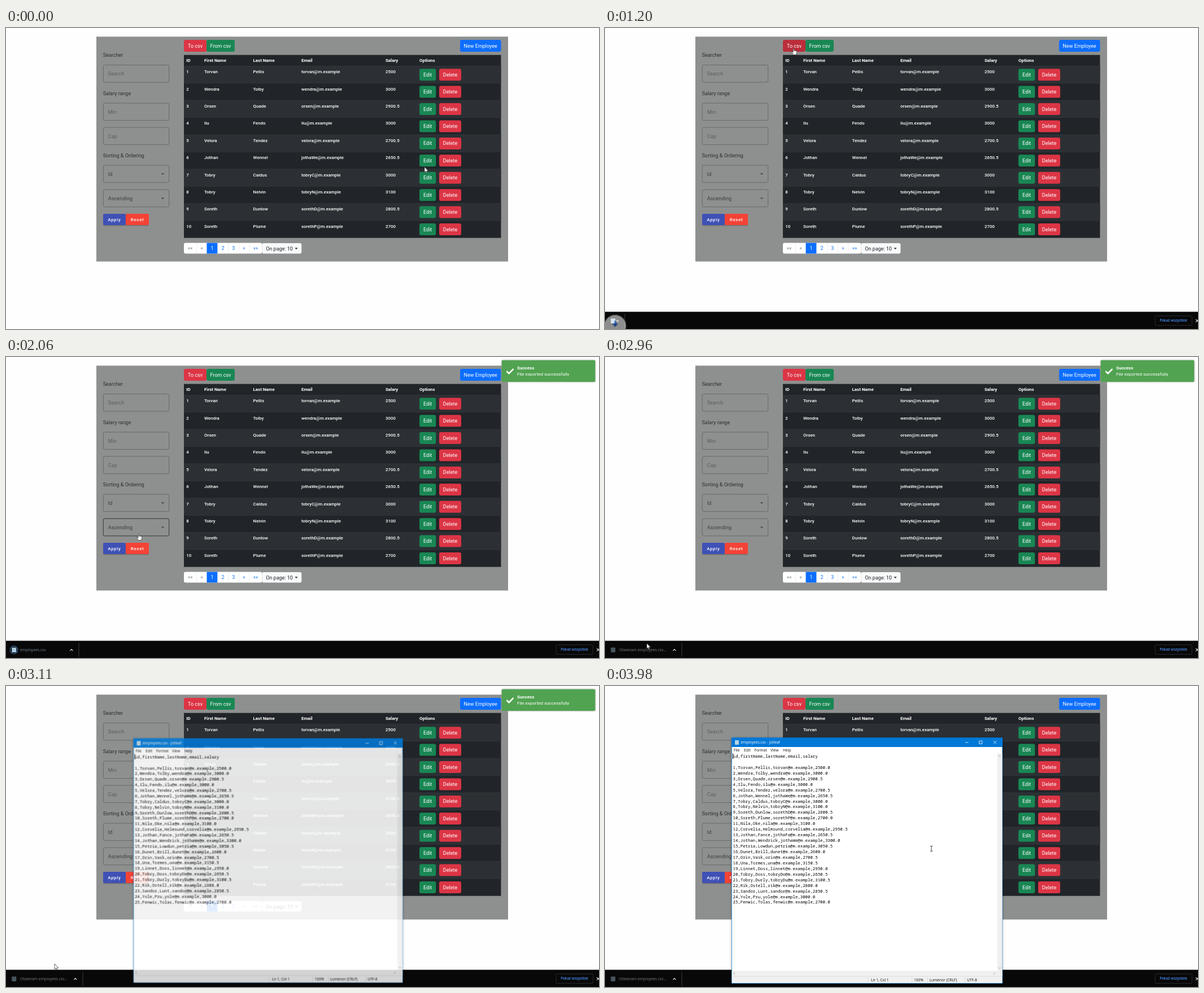
Animation of 1050x533 px, one loop 4510 ms. Source, as an HTML page:

```html
<!DOCTYPE html>
<html lang="en">
<head>
<meta charset="utf-8">
<title>Employee export</title>
<style>
html, body { margin: 0; width: 100%; height: 100%; overflow: hidden; background: #fefefe; }
svg { display: block; position: absolute; left: 0; top: 0; }
text { font-family: Roboto, sans-serif; font-size: 9px; fill: #fff; }
.mid { text-anchor: middle; }
.label { fill: #2b2e30; }
.field { fill: none; stroke: #5f6160; stroke-width: .8; }
.hint { fill: #5b5d5c; letter-spacing: .15px; }
.value { fill: #3b3d3d; letter-spacing: .15px; }
.raised { font-size: 7.9px; font-weight: 500; letter-spacing: .7px; }
.head { font-size: 7.9px; font-weight: 700; }
.cell { font-size: 7.9px; font-weight: 500; }
.link { fill: #0d6efd; }
.off { fill: #6c757d; }
.dark { fill: #212529; }
.note { font-size: 8px; }
.strong { font-weight: 700; }
.sys { font-family: "Open Sans", sans-serif; font-size: 6.6px; }
.ink { fill: #111; }
.busy { font-size: 6.75px; fill: #777c81; }
.all { font-size: 6.3px; font-weight: 600; fill: #4a90fb; }
.code { font-family: "Noto Sans Mono", monospace; font-size: 7.37px; fill: #000; }
.line { fill: none; }
#file { font: 6.75px/10px "Open Sans", sans-serif; color: #76838f; overflow: hidden; text-overflow: ellipsis; }

.anim, .cut { animation: 4510ms linear infinite; }
.cut { animation-timing-function: step-end; }
#toCsv { animation-name: press; }
#pick { animation-name: pick; }
#toast { animation-name: toast; }
#toast rect { filter: drop-shadow(0 0 1.8px #999); }
#shelf { animation-name: shelf; }
#edge { animation-name: edge; }
#file { animation-name: file; }
#plain { animation-name: plain; }
#opening { animation-name: opening; }
#icon { animation-name: icon; }
#ring { animation-name: ring; }
#bubble { animation-name: bubble; }
#bubble circle { filter: drop-shadow(0 0 1px #bbb); }
#win { animation-name: win; transform-origin: 464px 309px; }
#frame { filter: drop-shadow(0 1px 2px #0005); }
#caret { animation-name: caret; }
#cursor { animation-name: move; }
#arrow { animation-name: arrow; }
#hand { animation-name: hand; }
#beam { animation-name: beam; }

@keyframes press { 0%, 19% { fill: #dc3545 } 21%, 33.7% { fill: #bb2d3b } 36%, 100% { fill: #dc3545 } }
@keyframes pick { 0% { stroke: #5f6160 } 44.3% { stroke: #1c1e1e } 48% { stroke: #5f6160 } }
@keyframes toast { 0%, 27.9% { opacity: 0 } 31.5%, 73.5% { opacity: 1 } 80%, 100% { opacity: 0 } }
@keyframes shelf { 0%, 23.3% { transform: translateY(31px) } 26.6%, 100% { transform: none } }
@keyframes edge {
  0%, 25.06% { transform: translateX(22px) }
  32.15%, 33.6% { transform: translateX(80px) }
  38.14%, 59.86% { transform: translateX(129px) }
  59.87%, 100% { transform: translateX(136px) }
}
@keyframes file { 0%, 28.8% { width: 0 } 32.15%, 33.6% { width: 27px } 38.14%, 100% { width: 76px } }
@keyframes plain { 0% { opacity: 1 } 59.87% { opacity: 0 } }
@keyframes opening { 0% { opacity: 0 } 59.87% { opacity: 1 } }
@keyframes icon { 0% { opacity: 1 } 59.87% { opacity: .4 } }
@keyframes ring { 0%, 27.9% { opacity: 0 } 32%, 46% { opacity: .9 } 58%, 100% { opacity: 0 } }
@keyframes bubble {
  0%, 25% { transform: translateY(42px); opacity: 0 }
  28% { opacity: 1 }
  32.15%, 33.6% { transform: none; opacity: 1 }
  38.1%, 100% { transform: translateY(-36px); opacity: 0 }
}
@keyframes win {
  0%, 66.96% { transform: scale(.95); opacity: 0 }
  68.96%, 70.2% { transform: scale(.994); opacity: .88 }
  71.8%, 100% { transform: none; opacity: 1 }
}
@keyframes caret { 0% { opacity: 1 } 77.6% { opacity: 0 } 88.25% { opacity: 1 } }
@keyframes move {
  0%, 3.99% { transform: translate(741px, 246px) }
  5.54% { transform: translate(675px, 312px) }
  7.1% { transform: translate(575px, 365px) }
  8.43% { transform: translate(470px, 383px) }
  9.98% { transform: translate(395px, 335px) }
  11.53% { transform: translate(355px, 220px) }
  12.86% { transform: translate(338px, 112px) }
  14.41% { transform: translate(333px, 52px) }
  15.96%, 29.49% { transform: translate(334px, 36px) }
  32.15%, 33.7% { transform: translate(320px, 43px) }
  38.14%, 39.5% { transform: translate(287px, 120px) }
  45.68%, 47.2% { transform: translate(235px, 313px) }
  50.33% { transform: translate(131px, 422px) }
  57.65%, 67% { transform: translate(74px, 507px) }
  68.96%, 70.2% { transform: translate(86px, 492px) }
  74.72% { transform: translate(161px, 428px) }
  80% { transform: translate(370px, 345px) }
  86.7%, 100% { transform: translate(578px, 288px) }
}
@keyframes arrow { 0% { opacity: 1 } 15.9% { opacity: 0 } 31% { opacity: 1 } 44.3% { opacity: 0 } 49% { opacity: 1 } 76.3% { opacity: 0 } }
@keyframes hand { 0% { opacity: 0 } 15.9% { opacity: 1 } 31% { opacity: 0 } 44.3% { opacity: 1 } 49% { opacity: 0 } }
@keyframes beam { 0% { opacity: 0 } 76.3% { opacity: 1 } }
</style>
</head>
<body>
<svg id="stage" width="1050" height="533" viewBox="0 0 1050 533"></svg>
<script>
// first name, last name, salary, optional mailbox
const people = `Torvan Pellis 2500|Wendra Tolby 3000|Orsen Quade 2900.5|Ilu Fendo 3000|Velora Tendez 2700.5
Jothan Wennel 2650.5 jothaWe|Tobry Caldus 3000 tobryC|Tobry Nelvin 3100 tobryN|Soreth Dunlow 2800.5 sorethD
Soreth Plume 2700 sorethP|Nila Oke 3100|Corvelia Helmsund 2950.5|Jothan Fance 2650.5 jothaFa
Jothan Wendrick 3300 jothaWe|Petria Lowdun 3050.5|Dunet Brill 2600|Orin Vask 2700.5|Una Tormes 3150.5
Linnet Doss 2950|Tobry Doss 2650.5 tobryDo|Tobry Durly 3100.5 tobryDu|Rik Ostell 2800|Sandor Lunt 2850.5
Yole Pru 3000|Fenwic Tolas 2700`.split(/[|\n]/).map((row, i) => {
  const [first, last, pay, box = first.toLowerCase()] = row.split(' ');
  return { id: i + 1, first, last, mail: box + '@m.example', pay };
});

const rect = (x, y, w, h, fill, rx = 0, attrs = '') =>
  `<rect x="${x}" y="${y}" width="${w}" height="${h}" rx="${rx}" fill="${fill}" ${attrs}/>`;
const text = (x, y, s, cls = '') => `<text x="${x}" y="${y}" class="${cls}">${s}</text>`;
const line = (d, stroke, width = 1) => `<path d="${d}" class="line" stroke="${stroke}" stroke-width="${width}"/>`;
const shape = (d, fill) => `<path d="${d}" fill="${fill}"/>`;
const group = (id, cls, body) => `<g id="${id}" class="${cls}">${body}</g>`;
const button = (x, y, w, h, fill, label, attrs = '') =>
  rect(x, y, w, h, fill, 3.2, attrs) + text(x + w / 2, y + h / 2 + 3.1, label, 'mid');
const field = (y, label, cls = 'hint', id = '') =>
  `<rect id="${id}" class="field cut" x="172.3" y="${y}" width="116.4" height="30.6" rx="2.3"/>` +
  text(180.7, y + 18.9, label, cls);
const select = (y, label, id) =>
  field(y, label, 'value', id) + shape(`M274.6 ${y + 14.2}h5.8l-2.9 2.9z`, '#474948');

function sidebar() {
  return text(171.7, 51.3, 'Searcher', 'label') + field(65.5, 'Search') +
    text(171.7, 118.7, 'Salary range', 'label') + field(133, 'Min') + field(176, 'Cap') +
    text(171.7, 229.3, 'Sorting &amp; Ordering', 'label') +
    select(243, 'Id', 'order') + select(286.2, 'Ascending', 'pick') +
    rect(172, 330, 81, 20.4, '#0003', 2) +
    rect(172, 329, 40, 20, '#3f51b5', 2) + text(180.2, 341.5, 'Apply', 'raised') +
    rect(212, 329, 41, 20, '#f44336', 2) + text(220.8, 341.5, 'Reset', 'raised');
}

function table() {
  const cols = [319.3, 351, 437.6, 523, 672, 732];
  const top = 67.3, pitch = 30.42;
  let out = rect(315, 47.7, 561.5, 324, '#212529');
  ['ID', 'First Name', 'Last Name', 'Email', 'Salary', 'Options']
    .forEach((h, i) => out += text(cols[i], 60, h, 'head'));
  people.slice(0, 10).forEach((p, r) => {
    const y = top + r * pitch;
    if (r % 2 === 0) out += rect(315, y, 561.5, pitch, '#2c3034');
    out += rect(315, y - .3, 561.5, .6, '#373b3e');
    [p.id, p.first, p.last, p.mail, p.pay].forEach((v, i) => out += text(cols[i], y + 12.8, v, 'cell'));
    out += button(732, y + 4.9, 29.3, 21, '#198754', 'Edit') + button(767, y + 4.9, 39, 21, '#dc3545', 'Delete');
  });
  return out;
}

function pager() {
  const cells = [['««', 315, 'off'], ['«', 337.5, 'off'], ['1', 355.5, ''], ['2', 374.5, 'link'],
    ['3', 393.5, 'link'], ['»', 412.3, 'link'], ['»»', 430.5, 'link']];
  let out = rect(315, 380.5, 138.3, 19, '#fff', 3);
  cells.forEach(([s, x, cls], i) => {
    const end = i < 6 ? cells[i + 1][1] : 453.3;
    out += cls ? (i ? rect(x, 380.7, .6, 18.6, '#dee2e6') : '') : rect(x, 380.5, end - x, 19, '#0d6efd');
    out += text((x + end) / 2, 393.2, s, 'mid ' + cls);
  });
  return out + rect(453.3, 381, 70, 18.5, '#f8f9fa', 3) + text(460.2, 394, 'On page: 10', 'dark') +
    shape('M511.4 389.2h5.2l-2.6 2.7z', '#212529');
}

function page() {
  return rect(160, 15.3, 729, 398.2, '#8e908f') + sidebar() +
    button(315, 21, 40, 21, '#dc3545', 'To csv', 'id="toCsv" class="anim"') +
    button(355, 21, 50, 21, '#198754', 'From csv') +
    button(804, 21, 72.5, 21, '#0d6efd', 'New Employee') + table() + pager();
}

function toast() {
  return group('toast', 'anim', rect(877.7, 5.7, 165.6, 38.3, '#51a351', 1.7) +
    line('M886.5 25.2l4 4 8-8', '#fff', 2.6) +
    text(905, 21.7, 'Success', 'note strong') + text(905, 32.6, 'File exported successfully', 'note'));
}

function shelf() {
  const bar = rect(0, 502.5, 1050, 31, '#080808') +
    `<circle id="ring" class="anim" cx="14" cy="518.7" r="6.8" fill="none" stroke="#3a78b8" stroke-width="1.1"/>` +
    group('icon', 'cut', rect(10.3, 514.5, 8, 8.5, '#a9c8dc', 1)) +
    group('plain', 'cut', `<foreignObject x="25" y="513.5" width="110" height="12">
      <div id="file" class="anim">employees.csv</div></foreignObject>`) +
    group('opening', 'cut', text(25, 521.3, 'Otwieram employees.csv...', 'sys busy')) +
    group('edge', 'anim', line('M0 506.5V531', '#444', .9) + line('M-15.6 520.2l2.5-2.5 2.5 2.5', '#e8e8e8', 1.2)) +
    rect(974, 509.8, 65.3, 16.8, 'none', 2, 'stroke="#34373b" stroke-width=".8"') +
    text(1006.5, 520.4, 'Pokaż wszystkie', 'sys mid all') +
    line('M1046 515.8l5 5m0-5l-5 5', '#e8e8e8', 1.1);
  const bubble = '<circle cx="18" cy="495" r="19" fill="#fff"/>' +
    shape('M16 486h4v5h3.6l-5.6 6-5.6-6h3.6z', '#3b7de9') + rect(9, 504.3, 18, 2, '#3b7de9');
  return group('shelf', 'anim', bar) + group('bubble', 'anim', bubble);
}

function editor() {
  const sys = (x, y, s) => text(x, y, s, 'sys ink');
  const gray = '#f0f0f0', arrow = '#9a9a9a';
  let out = rect(224, 91.2, 480, 435.6, '#0078d7', 0, 'id="frame"') + rect(224.7, 108, 478.6, 418.1, '#fff') +
    rect(230, 96, 7, 8, '#b5d3e4', 1) + text(240.3, 102.3, 'employees.csv - Jotleaf', 'sys') +
    line('M637.5 100h6M662.5 97.2h5.2v5.2h-5.2zM688 97l5 5m0-5l-5 5', '#fff', .8);
  [['File', 228], ['Edit', 246], ['Format', 264.5], ['View', 293], ['Help', 315]]
    .forEach(([s, x]) => out += sys(x, 116, s));
  out += rect(694.5, 119, 8.8, 395, gray) + rect(224.7, 504.2, 478.6, 9.8, gray) +
    line('M696.8 125l2-2 2 2M696.8 498.5l2 2 2-2M230 506.8l-2 2 2 2M688.5 506.8l2 2-2 2', arrow, .9) +
    rect(224.7, 514, 478.6, 12.1, gray) +
    line('M225 514h478M465.5 515v10M543.5 515v10M571.5 515v10M637.5 515v10', '#d7d7d7', .8);
  [['Ln 1, Col 1', 471], ['100%', 547], ['Lumenor (CRLF)', 574.5], ['UTF-8', 641]]
    .forEach(([s, x]) => out += sys(x, 522.7, s));
  const rows = ['id,firstName,lastName,email,salary', '',
    ...people.map(p => [p.id, p.first, p.last, p.mail, (+p.pay).toFixed(1)].join())];
  rows.forEach((s, i) => out += text(226.5, 127 + i * 9.94, s, 'code'));
  return group('win', 'anim', out + rect(226, 119.3, 1, 9.7, '#000', 0, 'id="caret" class="cut"'));
}

function cursor() {
  const outline = 'fill="#fff" stroke="#222" stroke-width=".7" stroke-linejoin="round"';
  return group('cursor', 'anim', `
    <path id="arrow" class="cut" d="M0 0v9.6l2.2-2 1.5 3.5 1.5-.7-1.5-3.3h3z" ${outline}/>
    <path id="hand" class="cut" d="M-.9 1q.9-1.6 1.8 0v3.2q.9-.7 1.7.2.9-.6 1.6.3 1-.4 1.4.7v2.6l-1 3.4h-5l-3-4.2q-.3-1.4 1-1l1.5 1.2z" ${outline}/>
    <path id="beam" class="cut line" d="M-2.2-4.5h1.6l.6.5.6-.5h1.6M0-4v8M-2.2 4.5h1.6l.6-.5.6.5h1.6" stroke="#222" stroke-width=".9"/>`);
}

document.getElementById('stage').innerHTML = page() + shelf() + toast() + editor() + cursor();
</script>
</body>
</html>
```
